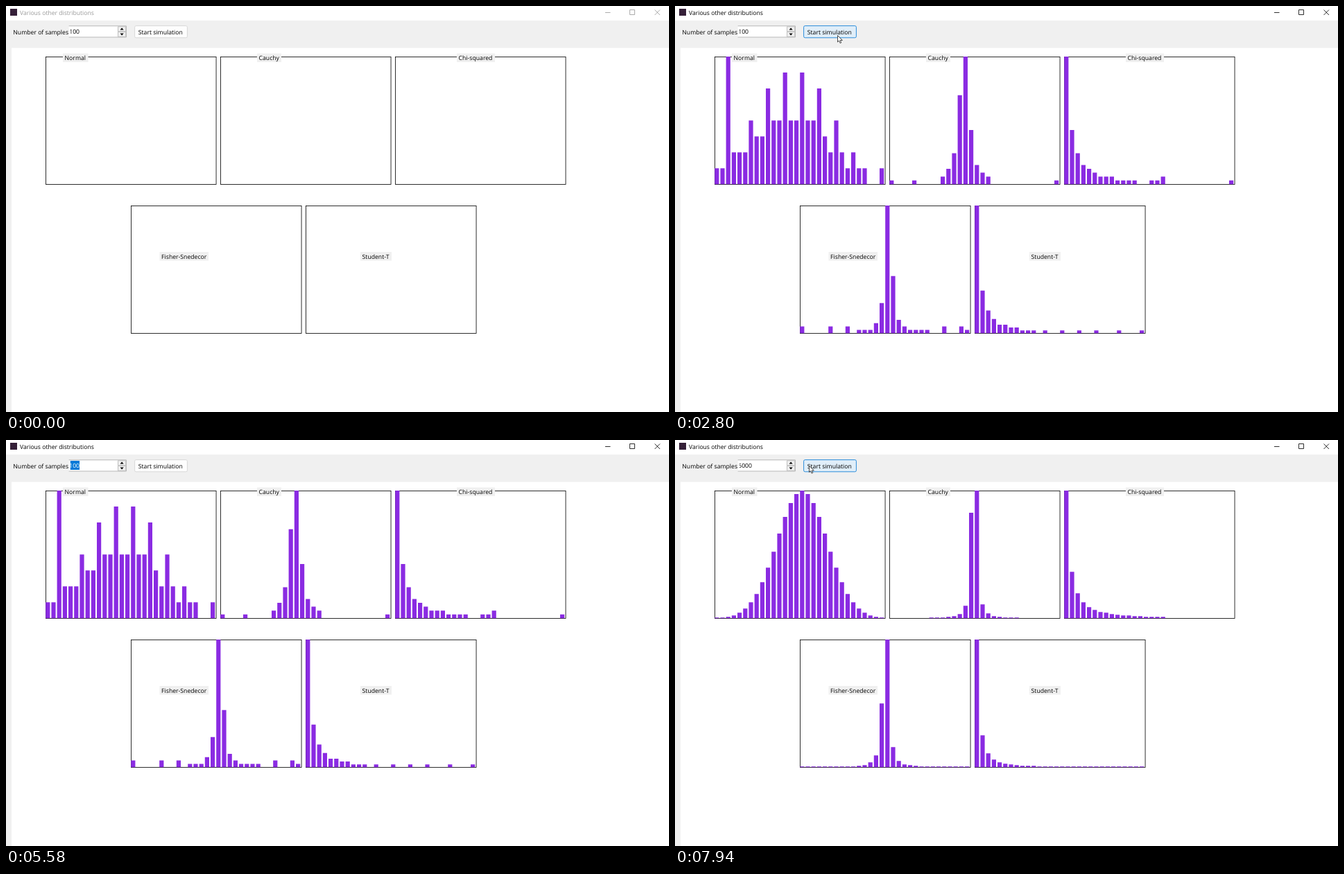
Recreate the animation shown at these times as an HTML page. Size 956 by 586 pixels, loop 8 s.

```html
<!DOCTYPE html>
<html lang="en">
<head>
<meta charset="utf-8">
<title>Various other distributions</title>
<style>
  html, body { margin: 0; height: 100%; overflow: hidden; background: #fff; }
  svg { display: block; }
  text { font: 8.67px "Open Sans", "Noto Sans", sans-serif; text-rendering: geometricPrecision; white-space: pre; }
</style>
</head>
<body>
<svg id="stage" width="956" height="586" viewBox="0 0 956 586" stroke-width=".82">
  <rect width="956" height="586" fill="#fff"/>
  <path d="M0 21H956V60.5H8V586H0Z" fill="#f0f0f0"/>

  <rect x="6" y="4" width="10" height="10" fill="#352038"/>
  <text id="title" x="20" y="13" style="font-size:8.6px">Various other distributions</text>
  <path id="controls" d="M864 9.5h7.5M899.5 5.5h7v7h-7zM935.5 5.5l7.5 7.5M943 5.5l-7.5 7.5" fill="none"/>

  <text x="10.3" y="40.5">Number of samples</text>
  <path d="M90.6 28.8H173.4V45H90.6" fill="#fff" stroke="#a8a8a8"/>
  <path d="M161.5 29.8h11.2v7h-11.2zM161.5 37.3h11.2v7h-11.2z" fill="#f0f0f0" stroke="#b4b4b4"/>
  <path d="M164.5 34.6l2.6-3 2.6 3zM164.5 39.4l2.6 3 2.6-3z"/>
  <svg x="92.8" y="30" width="68" height="14" viewBox="92.8 30 68 14">
    <rect id="selection" x="92" y="30" width="14" height="13" fill="#0078d7"/>
    <text id="number" x="91.2" y="40.2"></text>
    <rect id="caret" y="30" width=".82" height="13"/>
  </svg>

  <rect id="button" x="185.6" y="28.6" width="75.8" height="17.2" rx="2"/>
  <text x="190.8" y="40.5">Start simulation</text>

  <g id="charts"></g>

  <path id="arrow" d="M.5 .5V10L2.6 8 4.1 11.6 5.7 10.9 4.3 7.5H7.3Z" fill="#fff" stroke="#222"/>
  <path id="beam" d="M-2.5-6h2l.5.5.5-.5h2M0-5.5V5.5M-2.5 6h2l.5-.5.5.5h2" fill="none" stroke="#222"/>
</svg>
<script>
const $ = id => document.getElementById(id);
const LOOP = 8000, BINS = 30, PITCH = 8.2, PLOT = 184.3;

// Histogram shapes: weight of bin i
const bell = (mid, dev, ripple = 0) => i =>
  Math.exp(-(((i - mid) / dev) ** 2) / 2) * (1 + ripple * Math.cos(i * Math.PI * 2 / 3));
const spike = (mid, width) => i => Math.atan((i + 1 - mid) / width) - Math.atan((i - mid) / width);
const decay = (power, reach) => i => (i + 1) ** -power * Math.exp(-i / reach);

// Whole counts for bins first..last, plus stray samples outside the main body
function histogram(shape, peak, first = 0, last = BINS - 1, strays = {}) {
  const weights = Array.from({ length: BINS }, (_, i) => shape(i));
  const unit = peak / Math.max(...weights);
  const counts = weights.map((w, i) => i < first || i > last ? 0 : Math.max(1, Math.round(w * unit)));
  return Object.assign(counts, strays);
}

// Each plot: its corner, its label, and the histograms of the two runs
const plots = [
  { x: 57, y: 73, name: 'Normal', left: 82, top: 68.5, width: 36.5, runs: [
    histogram(bell(13, 6.5, .4), 7.5, 0, 26, { 2: 8, 29: 1 }),
    histogram(bell(15, 4.4), 184)] },
  { x: 309, y: 73, name: 'Cauchy', left: 362, top: 68.5, width: 35, runs: [
    histogram(spike(13.25, .9), 33, 9, 17, { 0: 1, 4: 1, 29: 1 }),
    histogram(spike(15.04, .3), 184, 7, 22)] },
  { x: 561, y: 73, name: 'Chi-squared', left: 650, top: 68.5, width: 55, runs: [
    histogram(decay(1.15, 15), 33, 0, 12, { 15: 1, 16: 1, 17: 2, 29: 1 }),
    histogram(decay(1.4, 25), 184, 0, 17)] },
  { x: 180, y: 288, name: 'Fisher-Snedecor', left: 221.5, top: 355, width: 70.5, runs: [
    histogram(spike(15.7, .5), 38, 10, 22, { 0: 2, 5: 2, 8: 2, 25: 2, 28: 2, 29: 1 }),
    histogram(spike(15.2, .4), 184)] },
  { x: 432, y: 288, name: 'Student-T', left: 511, top: 355, width: 45, runs: [
    histogram(decay(1.6, 1e3), 45, 0, 10, { 12: 1, 15: 1, 18: 1, 21: 1, 25: 1, 29: 1 }),
    histogram(decay(2, 1e3), 184)] }
];

// The tallest bar fills the plot
function barPath(counts, x, y) {
  const unit = PLOT / Math.max(...counts);
  return counts.map((n, i) => n
    ? `M${x + .2 + i * PITCH} ${y + PLOT}v${-n * unit}h6.2v${n * unit}z` : '').join('');
}

$('charts').innerHTML = plots.map(p => `
  <rect x="${p.x + .45}" y="${p.y + .45}" width="245.6" height="184" fill="none" stroke="#000"/>
  <path class="bars" fill="#8a2be2"/>
  <rect x="${p.left}" y="${p.top}" width="${p.width}" height="12.5" fill="#f0f0f0"/>
  <text x="${p.left + 2.6}" y="${p.top + 9.6}">${p.name}</text>`).join('');

const bars = [...document.querySelectorAll('.bars')];
const paths = plots.map(p => p.runs.map(counts => barPath(counts, p.x, p.y)));

// Pointer routes: time, x, y
const routes = [
  [[1380, 48, 570], [1590, 125, 330], [1800, 212, 85], [1930, 256, 10], [2140, 234, 42],
    [3670, 234, 42], [4020, 148, 64], [4085, 148, 64], [4440, 132.5, 36.5], [5580, 132.5, 36.5]],
  [[6620, 132.5, 36.5], [6840, 165, 4], [6980, 191, 26.5], [7045, 191, 26.5],
    [7260, 193, 36.5], [LOOP, 193, 36.5]]
];

function pointerAt(t) {
  const route = routes.find(r => t >= r[0][0] && t < r[r.length - 1][0]);
  if (!route) return null;
  const i = route.findIndex(k => k[0] > t);
  const [t0, x0, y0] = route[i - 1], [t1, x1, y1] = route[i];
  const p = (t - t0) / (t1 - t0);
  return [x0 + (x1 - x0) * p, y0 + (y1 - y0) * p];
}

const within = (t, a, b) => t >= a && t < b;
const inside = (p, l, t, r, b) => !!p && within(p[0], l, r) && within(p[1], t, b);
const show = (id, on) => $(id).setAttribute('visibility', on ? 'visible' : 'hidden');

function drawField(t) {
  const typed = [5690, 5780, 5920, 6050].filter(k => t >= k).length;
  const text = typed ? '5000'.slice(0, typed) : '100';
  const selected = within(t, 5580, 5690);
  $('number').textContent = text;
  $('number').setAttribute('fill', selected ? '#fff' : '#000');
  $('caret').setAttribute('x', 91 + text.length * 4.95);
  show('selection', selected);
  show('caret', within(t, 4650, 5180) || within(t, 5690, 6580) || within(t, 7110, 7530));
}

function drawButton(t, pointer) {
  const hover = inside(pointer, 185, 28, 262, 46);
  const pressed = within(t, 2670, 2740) || within(t, 7530, 7600);
  const focused = within(t, 2670, 4650) || t >= 7530;
  $('button').setAttribute('fill', pressed ? '#cce4f7' : hover ? '#e0eef9' : '#fdfdfd');
  $('button').setAttribute('stroke', hover || focused ? '#0078d4' : '#d2d2d2');
}

function drawPointer(pointer) {
  const overField = inside(pointer, 91, 29, 161, 45);
  show('arrow', pointer && !overField);
  show('beam', overField);
  if (pointer) $(overField ? 'beam' : 'arrow').setAttribute('transform', `translate(${pointer})`);
}

function draw(t) {
  const tone = t < 2670 ? '#999' : '#000';
  $('title').setAttribute('fill', tone);
  $('controls').setAttribute('stroke', tone);
  bars.forEach((bar, i) => {
    const d = t < 2740 ? '' : paths[i][t < 7660 + i * 70 ? 0 : 1];
    if (bar.getAttribute('d') !== d) bar.setAttribute('d', d);
  });
  const pointer = pointerAt(t);
  drawField(t);
  drawButton(t, pointer);
  drawPointer(pointer);
}

const start = performance.now();
function tick() {
  draw((performance.now() - start) % LOOP);
  requestAnimationFrame(tick);
}
tick();
</script>
</body>
</html>
```
